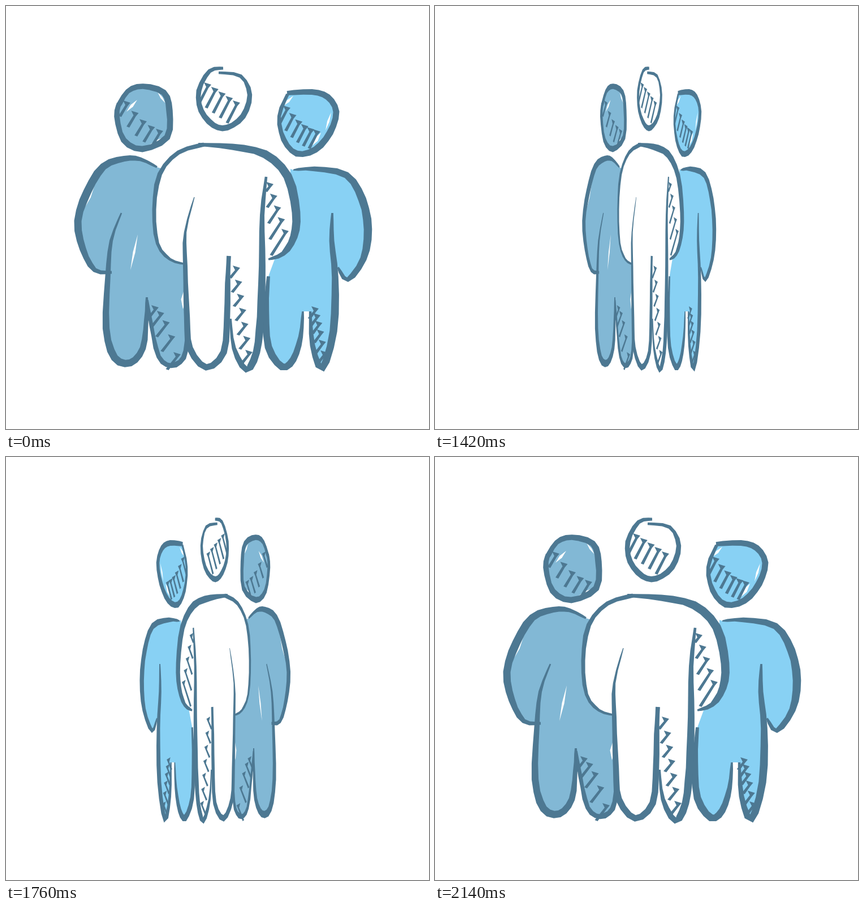
An HTML page that plays this animation: 748 by 748 pixels, repeating every 2.98 s.

```html
<!DOCTYPE html>
<html lang="en">
<head>
<meta charset="utf-8">
<title>Turning group</title>
<style>
  html, body { margin: 0; width: 100%; height: 100%; overflow: hidden; background: #fff; }
  svg { display: block; width: 100vw; height: 100vh; }
</style>
</head>
<body>
<svg viewBox="0 0 748 748"><g id="group"></g></svg>
<script>
const INK = '#4d7892', DUSK = '#82b8d5', SKY = '#88d1f4', WHITE = '#fff';
const group = document.getElementById('group');

let seed = 7;
const jitter = size => {
  seed = seed * 16807 % 2147483647;
  return (seed / 2147483647 * 2 - 1) * size;
};

function add(points, color) {
  const path = document.createElementNS('http://www.w3.org/2000/svg', 'path');
  path.setAttribute('d', 'M' + points.map(p => p.map(v => v.toFixed(1)).join(' ')).join('L') + 'Z');
  path.setAttribute('fill', color);
  group.append(path);
}

// Smooth line through key points, sampled coarsely for an angular hand-drawn look.
function curve(text, parts = 3) {
  const keys = text.split(',').map(pair => pair.trim().split(' ').map(Number));
  const key = i => keys[Math.max(0, Math.min(keys.length - 1, i))];
  const points = [];
  for (let i = 0; i < keys.length - 1; i++) {
    for (let k = 0; k < parts; k++) {
      const u = k / parts;
      points.push([0, 1].map(n => {
        const [a, b, c, d] = [-1, 0, 1, 2].map(o => key(i + o)[n]);
        return b + u * (c - a + u * (2 * a - 5 * b + 4 * c - d + u * (3 * b - a - 3 * c + d))) / 2;
      }));
    }
  }
  points.push(keys[keys.length - 1]);
  return points;
}

// Ink stroke whose width runs from one end value to the other with a bulge between.
function brush(line, from, to, bulge) {
  const left = [], right = [], last = line.length - 1;
  line.forEach(([x, y], i) => {
    const a = line[Math.max(i - 1, 0)], b = line[Math.min(i + 1, last)], u = i / last;
    const dx = b[0] - a[0], dy = b[1] - a[1];
    const width = from + (to - from) * u + bulge * Math.sin(Math.PI * u) + jitter(.8);
    const k = width / 2 / Math.hypot(dx, dy);
    left.push([x - dy * k, y + dx * k]);
    right.unshift([x + dy * k, y - dx * k]);
  });
  add([...left, ...right], INK);
}

// Row of nail-like lines: heads run from one point to another, sagging between them.
function hatch([x1, y1], [x2, y2], count, [dx, dy], sag = 0, first = .9) {
  for (let i = 0; i < count; i++) {
    const u = i / (count - 1), size = first + (1 - first) * u;
    const x = x1 + (x2 - x1) * u, y = y1 + (y2 - y1) * u + sag * Math.sin(Math.PI * u);
    const ex = x + dx * size, ey = y + dy * size;
    add([[x - 7, y - 4], [x + 6, y], [x + 1, y + 6], [ex + 2.5, ey + 1], [ex - 2.5, ey - 1], [x - 3, y + 4]], INK);
  }
}

// Thin white lens left by the dry brush.
function glint(x1, y1, x2, y2, width = 4) {
  const k = width / 2 / Math.hypot(x2 - x1, y2 - y1);
  const mx = (x1 + x2) / 2, my = (y1 + y2) / 2, nx = (y1 - y2) * k, ny = (x2 - x1) * k;
  add([[x1, y1], [mx + nx, my + ny], [x2, y2], [mx - nx, my - ny]], WHITE);
}

const below = (line, y) => line.filter(p => p[1] > y);

function drawLeft() {
  const head = curve('197 180, 215 151, 242 142, 279 153, 289 185, 285 232, 241 253, 208 237, 196 195, 200 172');
  add(head, DUSK);
  glint(213, 187, 232, 166, 5);
  glint(268, 152, 282, 172);
  glint(279, 232, 252, 247);
  hatch([214, 171], [272, 221], 5, [-14, 27], 8);
  brush(head, 8, 8, 3);

  const arm = curve('267 285, 238 271, 209 270, 172 284, 144 328, 127 380, 136 430, 157 467, 187 471');
  const leg = curve('204 366, 186 415, 180 480, 177 570, 192 622, 220 631, 242 605, 248 555, 249 515');
  const leg2 = curve('250 520, 257 565, 270 620, 292 636, 314 622, 321 585');
  add([...arm, ...below(leg, 470), ...leg2, [318, 455], [268, 390], [277, 288]], DUSK);
  glint(158, 313, 136, 362, 6);
  glint(233, 404, 220, 467);
  glint(315, 502, 313, 536, 9);
  hatch([264, 533], [303, 616], 5, [-18, 27], -15);
  brush(arm, 3, 5, 10);
  brush(leg, 2, 4, 10);
  brush(leg2, 4, 8, 3);
}

function drawRight() {
  const head = curve('497 154, 541 152, 569 161, 584 187, 573 224, 547 254, 514 261, 491 236, 483 195, 498 156');
  add(head, SKY);
  glint(575, 188, 565, 220);
  glint(557, 224, 539, 249, 8);
  glint(508, 159, 490, 177, 5);
  hatch([497, 180], [550, 222], 6, [-14, 30], 8);
  brush(head, 8, 5, 5);

  const arm = curve('508 290, 545 288, 602 299, 630 342, 640 395, 632 447, 604 484, 587 462');
  const leg = curve('577 366, 576 415, 582 480, 579 575, 559 641, 542 600, 538 540');
  const leg2 = curve('464 478, 460 540, 464 603, 488 638, 508 625, 521 585, 525 540');
  add([...arm, ...below(leg, 470), ...leg2.slice().reverse(), [500, 380], [503, 288]], SKY);
  hatch([547, 535], [563, 613], 6, [-12, 20], -6);
  brush(arm, 3, 4, 11);
  brush(leg, 3, 4, 10);
  brush(leg2, 6, 4, 8);
}

function drawCentre() {
  const head = curve('384 110, 360 115, 341 150, 345 185, 367 211, 391 215, 419 195, 431 157, 415 124, 376 118');
  add(head, WHITE);
  hatch([357, 139], [408, 171], 5, [-17, 36]);
  brush(head, 5, 4, 6);

  const back = curve('350 245, 305 259, 272 297, 262 360, 268 420, 290 448, 315 456');
  const arm = curve('340 245, 400 249, 458 262, 498 301, 513 365, 509 408, 490 438, 464 448');
  const leg = curve('333 338, 317 400, 317 460, 320 550, 325 605, 354 639, 385 612, 391 545, 392 490, 394 442');
  const leg2 = curve('397 553, 403 605, 425 643, 443 612, 450 550, 453 460, 453 370, 460 302');
  add([...back, ...below(leg, 456), ...below(leg2, 450), ...arm.slice().reverse()], WHITE);
  hatch([467, 315], [494, 398], 5, [-25, 43], 0, .3);
  hatch([408, 463], [430, 612], 7, [-13, 20]);
  brush(back, 8, 3, 2);
  brush(arm, 6, 4, 11);
  brush(leg, 2, 7, 7);
  brush(leg2, 3, 4, 10);
}

drawLeft();
drawRight();
drawCentre();

// The group makes one eased turn about an upright axis in every loop.
const LOOP = 2980, STEP = 20, AXIS = 374.5;
const TURN = { from: 1138, length: 1024, shown: [1180, 2140] };

function draw(now) {
  const time = Math.floor((now % LOOP) / STEP) * STEP;
  const moving = time >= TURN.shown[0] && time < TURN.shown[1];
  const ease = moving ? (1 - Math.cos(Math.PI * (time - TURN.from) / TURN.length)) / 2 : 0;
  const scale = Math.cos(ease * 2 * Math.PI);
  group.setAttribute('transform', `translate(${AXIS} 0) scale(${scale.toFixed(4)} 1) translate(${-AXIS} 0)`);
}

const start = performance.now();
function tick() {
  draw(performance.now() - start);
  requestAnimationFrame(tick);
}
tick();
</script>
</body>
</html>
```
